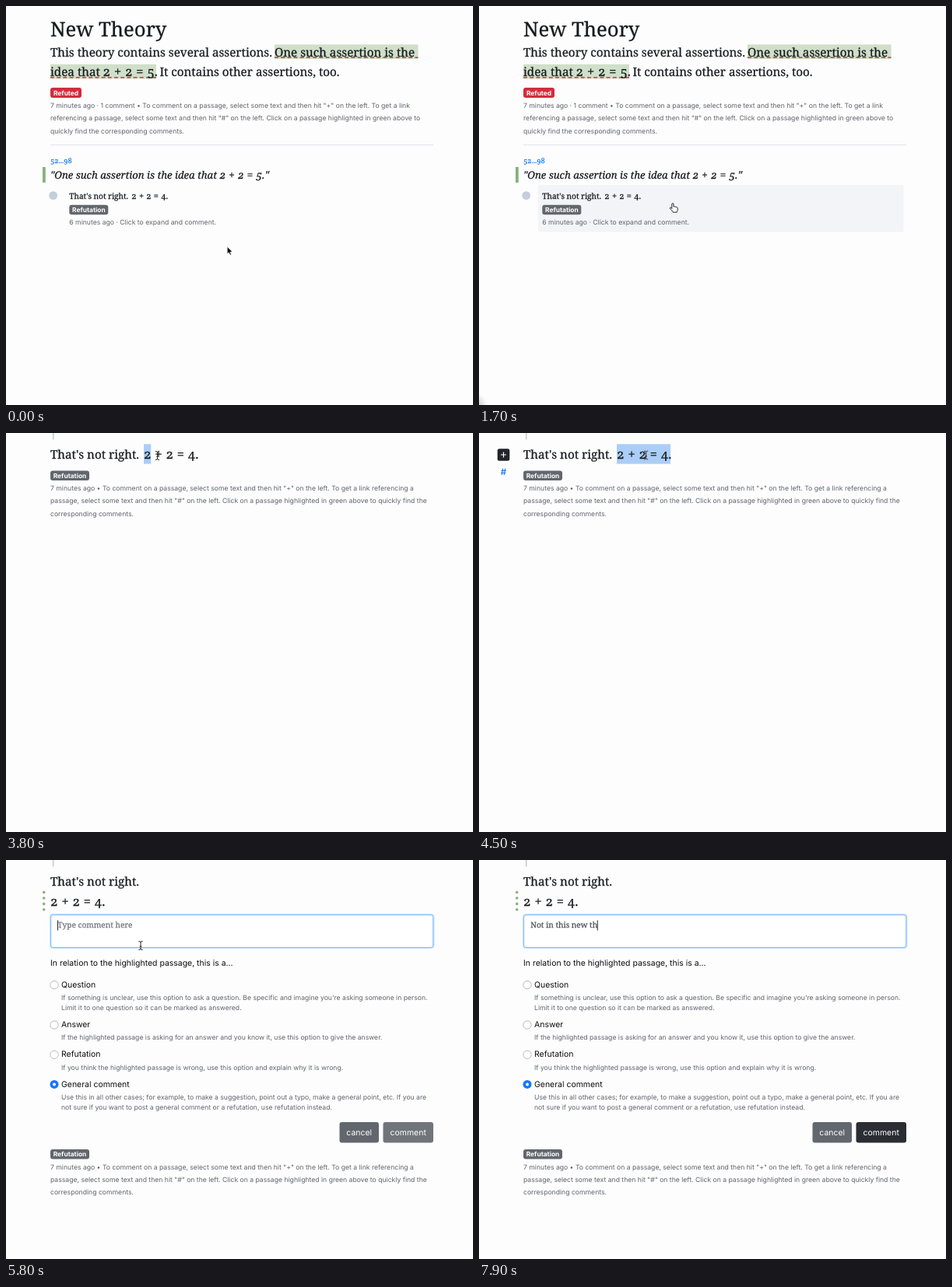
Animation of 600 by 513 pixels, one loop 8000 ms. Source, as an HTML page:

```html
<!DOCTYPE html>
<html lang="en">
<head>
<meta charset="utf-8">
<title>New Theory</title>
<style>
  html, body { margin: 0; height: 100%; overflow: hidden; background: #fdfdfe; }
  svg { display: block; width: 600px; height: 513px; }
  text { white-space: pre; text-rendering: geometricPrecision; color: #16191c; fill: currentColor; }
  .serif { font-family: "Noto Serif", serif; font-variant-numeric: oldstyle-nums; stroke: currentColor; stroke-width: .25; }
  .title { font-size: calc(27.75px * var(--serif)); }
  .body { font-size: calc(16.47px * var(--serif)); }
  .note { font-size: calc(10.95px * var(--serif)); }
  .quote { font-size: calc(13.1px * var(--italic)); font-style: italic; }
  .math { word-spacing: .04em; }
  .body.math { font-size: calc(17.7px * var(--serif)); }
  .note.math { font-size: calc(11.8px * var(--serif)); }
  .quote.math { font-size: calc(13.5px * var(--italic)); }
  .small, .label, .badge { font-family: Inter, sans-serif; }
  .small { font-size: 8.64px; color: #5d646b; }
  .label { font-size: 10.46px; color: #0c0d0e; }
  .badge { font-size: 8.4px; font-weight: 700; }
  .badge, .button { color: #fff; text-anchor: middle; }
  .gray-box { fill: #62676e; }
  .dash { stroke: #d62f40; stroke-width: 1.6; stroke-dasharray: 4.9 3.3; }
  .mark { fill: #cfdfc9; }
  .green { fill: #86b27a; }
  .link { color: #1a7cf0; }
  .hover text { color: #0056b3; }
  .radio { fill: #fff; stroke: #aaa; stroke-width: .8; }
  #beam { fill: none; stroke: #222; filter: drop-shadow(0 0 .6px #fff); }
</style>
</head>
<body>
<svg viewBox="0 0 600 513">
  <defs>
    <radialGradient id="shade" cx="0" cy="1" r="1">
      <stop stop-color="#d4d4d4"/><stop offset="1" stop-color="#d4d4d4" stop-opacity="0"/>
    </radialGradient>
  </defs>

  <g id="theory">
    <text class="serif title" x="57" y="39">New Theory</text>
    <text class="serif body" x="57" y="65">This theory contains several assertions.</text>
    <g id="passage">
      <path class="mark" d="M345 49.5H529.5V68H345zM57 75H193V93.5H57z"/>
      <path class="dash" d="M345 66.3H529.5M57 92H193"/>
      <text class="serif body" x="345" y="65">One such assertion is the</text>
      <text class="serif body" x="57" y="90.3">idea that</text>
      <text class="serif body math" x="124.5" y="90.3">2 + 2 = 5.</text>
    </g>
    <text class="serif body" x="197.4" y="90.3">It contains other assertions, too.</text>
    <rect x="57" y="105" width="40" height="13" rx="3" fill="#d22d3d"/>
    <text class="badge" x="77" y="114.5">Refuted</text>
    <text class="small" x="57" y="131">7 minutes ago · 1 comment • To comment on a passage, select some text and then hit "+" on the left. To get a link</text>
    <text class="small" x="57" y="147.3">referencing a passage, select some text and then hit "#" on the left. Click on a passage highlighted in green above to</text>
    <text class="small" x="57" y="163.6">quickly find the corresponding comments.</text>
    <path d="M57 178.7H549" stroke="#dfe2e5"/>
    <text class="serif link" x="57" y="202.3" font-size="9" font-weight="500">52...98</text>
    <rect class="green" x="47" y="207" width="3.8" height="20"/>
    <text class="serif quote" x="57" y="221.5">"One such assertion is the idea that</text>
    <text class="serif quote math" x="274.5" y="221.5">2 + 2 = 5."</text>
    <rect id="row" x="76" y="230" width="469.5" height="60.5" rx="2" fill="#f2f4f7"/>
    <circle cx="60.7" cy="243.6" r="5.4" fill="#c3cddc"/>
    <text class="serif note" x="81.3" y="247.6">That's not right.</text>
    <text class="serif note math" x="161.3" y="247.6">2 + 2 = 4.</text>
    <rect class="gray-box" x="81.3" y="255.7" width="50" height="12.6" rx="3"/>
    <text class="badge" x="106.3" y="265">Refutation</text>
    <text class="small" x="81.3" y="281.2">6 minutes ago · Click to expand and comment.</text>
  </g>

  <g id="reply">
    <path d="M60.7 0V8.5" stroke="#c3cad4" stroke-width="1.6"/>
    <text class="serif body" x="57" y="33">That's not right.</text>
    <rect id="selection" x="177" y="14.3" height="25.4" fill="#abcef8"/>
    <text id="claim" class="serif body math">2 + 2 = 4.</text>
    <g id="tools">
      <rect id="ring" x="22.4" y="18.9" width="18" height="18" rx="3" fill="#b9bbbd"/>
      <rect x="23.7" y="20.2" width="15.6" height="15.6" rx="2.5" fill="#212529"/>
      <path d="M28 28H35M31.5 24.5V31.5" stroke="#fff" stroke-width="1.2"/>
      <text class="link" x="31.5" y="54" font-family="Inter, sans-serif" font-size="11.5" font-weight="600" text-anchor="middle">#</text>
    </g>
    <g id="footer">
      <rect class="gray-box" x="57" y="48.5" width="50" height="12.6" rx="3"/>
      <text class="badge" x="82" y="57.8">Refutation</text>
      <text class="small" x="57" y="74.1">7 minutes ago • To comment on a passage, select some text and then hit "+" on the left. To get a link referencing a</text>
      <text class="small" x="57" y="90.4">passage, select some text and then hit "#" on the left. Click on a passage highlighted in green above to quickly find the</text>
      <text class="small" x="57" y="106.8">corresponding comments.</text>
    </g>
  </g>

  <g id="form">
    <path d="M48.7 41.6V64" stroke="#86b27a" stroke-width="3.6" stroke-linecap="round" stroke-dasharray="0 7.4"/>
    <rect x="56" y="69" width="494.5" height="45" rx="4.5" fill="#bfdeff"/>
    <rect x="57.7" y="70.7" width="491" height="41.7" rx="3" fill="#fff" stroke="#80bdff"/>
    <text id="typed" class="serif note" x="66.3" y="87.4"></text>
    <path id="caret" d="M66.5 77.5V90.5" stroke="#111" stroke-width=".9"/>
    <text class="label" x="57" y="136.2">In relation to the highlighted passage, this is a...</text>
    <circle class="radio" cx="62" cy="160.6" r="5.2"/>
    <text class="label" x="71" y="163.7">Question</text>
    <text class="small" x="71" y="180">If something is unclear, use this option to ask a question. Be specific and imagine you're asking someone in person.</text>
    <text class="small" x="71" y="192.8">Limit it to one question so it can be marked as answered.</text>
    <circle class="radio" cx="62" cy="212" r="5.2"/>
    <text class="label" x="71" y="215.2">Answer</text>
    <text class="small" x="71" y="231.3">If the highlighted passage is asking for an answer and you know it, use this option to give the answer.</text>
    <circle class="radio" cx="62" cy="250.3" r="5.2"/>
    <text class="label" x="71" y="253.4">Refutation</text>
    <text class="small" x="71" y="269.6">If you think the highlighted passage is wrong, use this option and explain why it is wrong.</text>
    <circle cx="62" cy="288.4" r="5.5" fill="#1677fb"/>
    <circle cx="62" cy="288.4" r="2" fill="#fff"/>
    <text class="label" x="71" y="291.5">General comment</text>
    <text class="small" x="71" y="307.8">Use this in all other cases; for example, to make a suggestion, point out a typo, make a general point, etc. If you are</text>
    <text class="small" x="71" y="320.8">not sure if you want to post a general comment or a refutation, use refutation instead.</text>
    <rect class="gray-box" x="428.5" y="337" width="50.5" height="26.5" rx="3"/>
    <text class="label button" x="453.7" y="354">cancel</text>
    <rect id="submit" x="484.5" y="337" width="64.5" height="26.5" rx="3"/>
    <text class="label button" x="516.7" y="354">comment</text>
  </g>

  <rect id="status" x="0" y="499" width="10" height="14" fill="url(#shade)"/>

  <g id="cursor">
    <path id="arrow" d="M0 0V9.6L2.2 7.6 3.7 11 5.4 10.2 3.9 7H6.9Z" stroke="#fff" stroke-width=".8"/>
    <path id="hand" d="M-1.2.8a1.1 1.1 0 0 1 2.2 0V4.2c.3-.6 1.8-.6 2 .3 .4-.6 1.7-.4 1.8.4 .5-.4 1.4 0 1.4.9V8c0 1.5-1 1.6-1 3.2H.2c0-1.5-2.6-2.8-3.8-5 -.4-1 .7-1.6 1.5-.8L-1.2 6.6Z" fill="#fff" stroke="#111" stroke-width=".9"/>
    <path id="beam" d="M-2.6-5.5Q0-5.5 0-4 0-5.5 2.6-5.5M0-4V4M-2.6 5.5Q0 5.5 0 4 0 5.5 2.6 5.5M-1.3 1.2H1.3"/>
  </g>
</svg>
<script>
const LOOP = 8000;
const MESSAGE = 'Not in this new th';
const $ = id => document.getElementById(id);
const show = (id, on) => { $(id).style.display = on ? '' : 'none'; };
const during = (t, from, to) => t >= from && t < to;

// Noto Serif runs wide; scale each cut to the average advance of a book face.
const pen = document.createElement('canvas').getContext('2d');
function setScale(name, style, sample, ems) {
  pen.font = `${style} 100px "Noto Serif", serif`;
  const scale = ems * 100 / pen.measureText(sample).width;
  document.documentElement.style.setProperty(name, scale);
}
setScale('--serif', 'normal', 'This theory contains several assertions. ', 17.565);
setScale('--italic', 'italic', '"One such assertion is the idea that ', 16.6);

// Pointer moves: start, end, target x, target y, ease-out power
const start = [284.5, 310];
const moves = [
  [0, 800, 165, 86, 2.3],
  [950, 1650, 249, 254, 2.3],
  [2400, 3300, 179, 29, 2.3],
  [3700, 4200, 256, 29, 1],
  [4400, 5200, 30.5, 26.5, 1.5],
  [5400, 5800, 173, 110, 2.3],
  [5800, 6200, 176, 105, 1],
];
const shapes = [
  [0, 'arrow'], [620, 'hand'], [960, 'arrow'], [1350, 'hand'], [2100, 'arrow'],
  [3050, 'beam'], [5000, 'arrow'], [5550, 'beam'], [6300, ''],
];
// Right edges of the characters in the selectable sum
const edges = [186.2, 190.1, 200.7, 204.6, 213.8, 217.7, 228.3, 232.2, 241.5, 246];

function pointer(t) {
  let [x, y] = start;
  for (const [from, to, tx, ty, power] of moves) {
    if (t < from) break;
    const k = 1 - (1 - Math.min(1, (t - from) / (to - from))) ** power;
    x += (tx - x) * k;
    y += (ty - y) * k;
  }
  return [x, y];
}

function draw(t) {
  const [x, y] = pointer(t);
  const shape = shapes.findLast(([from]) => t >= from)[1];
  $('cursor').setAttribute('transform', `translate(${x} ${y})`);
  for (const id of ['arrow', 'hand', 'beam']) show(id, id === shape);

  const replying = t >= 1800, composing = t >= 5500;
  show('theory', !replying);
  show('reply', replying);
  show('form', composing);
  show('row', during(t, 1350, 1800));
  show('status', during(t, 1400, 2150));
  $('passage').classList.toggle('hover', during(t, 620, 960));

  const selected = t < 4200 ? edges.findLast(edge => edge < x - 5) : edges.at(-1);
  show('selection', during(t, 3700, 5500) && selected);
  $('selection').setAttribute('width', (selected || 177) - 177);
  show('tools', during(t, 4200, 5500));
  show('ring', t >= 5350);
  $('claim').setAttribute('x', composing ? 57 : 177);
  $('claim').setAttribute('y', composing ? 59.2 : 33);
  $('footer').setAttribute('transform', `translate(0 ${composing ? 323.5 : 0})`);

  if (composing) {
    const count = t < 6300 ? 0 : Math.floor((t - 6300) / 94) + 1;
    const typed = $('typed');
    typed.textContent = count ? MESSAGE.slice(0, count) : 'Type comment here';
    typed.style.color = count ? '#495057' : '#6c757d';
    const caretX = count ? typed.getComputedTextLength() : 0;
    $('caret').setAttribute('transform', `translate(${caretX} 0)`);
    show('caret', count || t < 6000);
    $('submit').setAttribute('fill', count ? '#2a2d32' : '#70757b');
  }
}

function tick() {
  draw(performance.now() % LOOP);
  requestAnimationFrame(tick);
}
tick();
</script>
</body>
</html>
```
